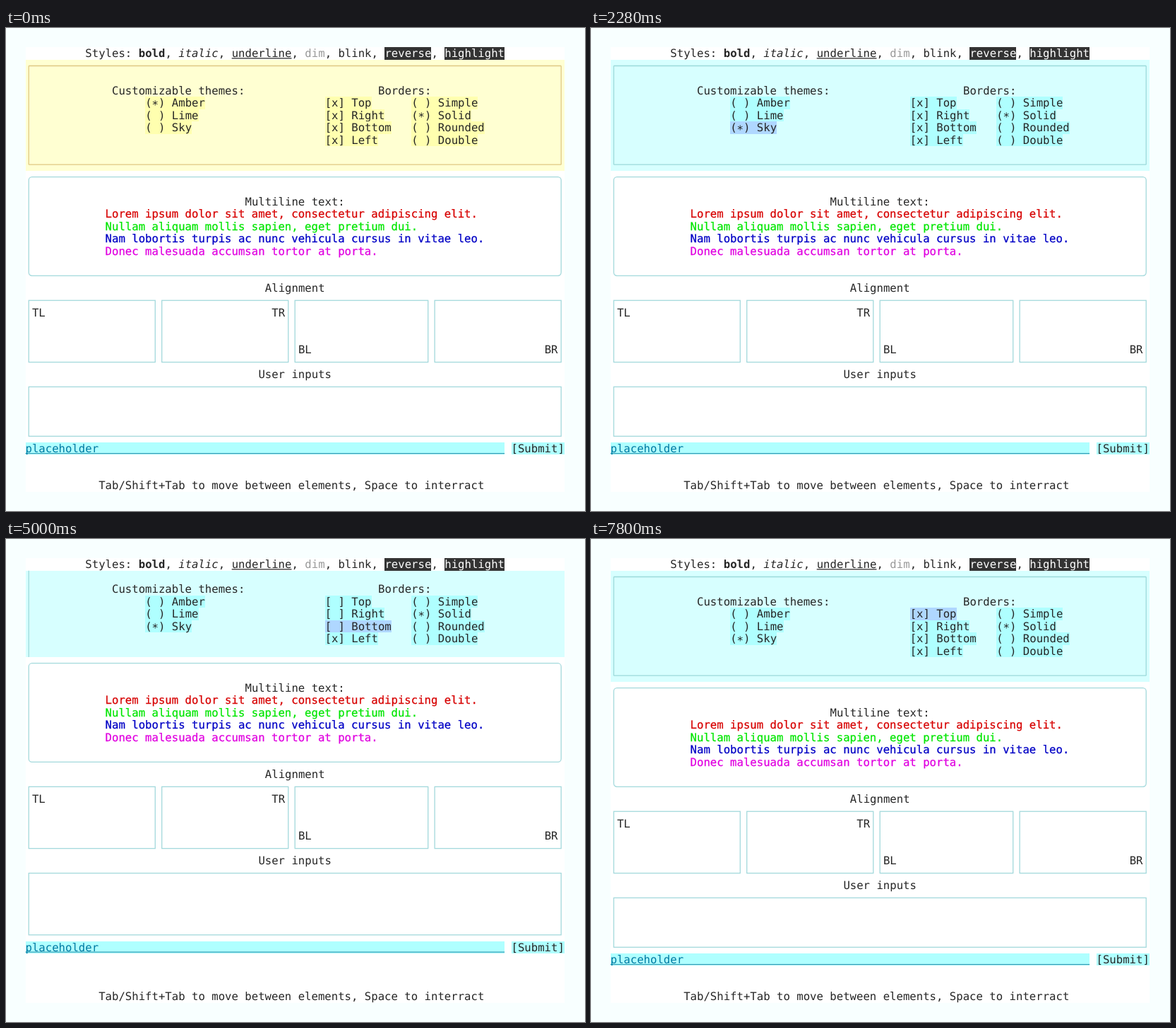
Write an HTML page that moves like this. It is 820 px wide and 683 px high and loops after 8000 ms.

```html
<!DOCTYPE html>
<html lang="en">
<head>
<meta charset="utf-8">
<title>Terminal form demo</title>
<style>
  html, body { margin: 0; width: 100%; height: 100%; overflow: hidden; background: #f8ffff; }
  svg { display: block; width: 820px; height: 683px; }
  text { font: 15.655px "DejaVu Sans Mono", monospace; white-space: pre; text-rendering: geometricPrecision; }
  rect { shape-rendering: crispEdges; }
  path { fill: none; stroke-width: 1.3; }
</style>
</head>
<body>
<svg id="screen" viewBox="0 0 820 683"></svg>
<script>
const LOOP = 8000, COLS = 81, ROWS = 36;
const CELL_W = 9.425, CELL_H = 17.46;
const INK = '#262626', LINE = '#a3d9dc';
const screen = document.getElementById('screen');

const themes = {
  Amber: { panel: '#ffffd2', item: '#ffffaf', focus: '#ffd7af', line: '#dfc883' },
  Lime: { panel: '#d7ffd7', item: '#d7ffaf', focus: '#d7d7af', line: '#aee0a0' },
  Sky: { panel: '#d7ffff', item: '#afffff', focus: '#afd7ff', line: '#9cd9da' },
};
const sides = ['Top', 'Right', 'Bottom', 'Left'];

// start time, selected theme, focused item, initials of the visible borders
const steps = [
  [0, 'Amber', '', 'TRBL'],
  [440, 'Amber', 'Amber', 'TRBL'],
  [920, 'Amber', 'Lime', 'TRBL'],
  [1360, 'Lime', 'Lime', 'TRBL'],
  [1800, 'Lime', 'Sky', 'TRBL'],
  [2280, 'Sky', 'Sky', 'TRBL'],
  [2680, 'Sky', 'Top', 'TRBL'],
  [3160, 'Sky', 'Top', 'RBL'],
  [3640, 'Sky', 'Right', 'RBL'],
  [4080, 'Sky', 'Right', 'BL'],
  [4560, 'Sky', 'Bottom', 'BL'],
  [5000, 'Sky', 'Bottom', 'L'],
  [5440, 'Sky', 'Left', 'L'],
  [5920, 'Sky', 'Left', ''],
  [6360, 'Sky', 'Left', 'L'],
  [6840, 'Sky', 'Bottom', 'BL'],
  [7320, 'Sky', 'Right', 'RBL'],
  [7800, 'Sky', 'Top', 'TRBL'],
];

const px = col => +(27.5 + col * CELL_W).toFixed(2);
const py = row => +(27.3 + row * CELL_H).toFixed(2);

const fill = (col, row, w, h, color) =>
  `<rect x="${px(col)}" y="${py(row)}" width="${w * CELL_W}" height="${h * CELL_H}" fill="${color}"/>`;

const text = (col, row, str, color = INK, attrs = '', dy = 0) =>
  `<text x="${px(col)}" y="${py(row) + 14 + dy}" fill="${color}" ${attrs}>${str}</text>`;

const stroke = (d, color) => `<path d="${d}" stroke="${color}"/>`;

const underline = (col, row, w, color) =>
  stroke(`M${px(col)} ${py(row) + 15.6}h${w * CELL_W}`, color);

// Boxes run through the centres of their outermost cells.
function box(c0, r0, c1, r1, radius = 0) {
  const x = px(c0 + .5), y = py(r0 + .5);
  return `<rect x="${x}" y="${y}" width="${px(c1 + .5) - x}" height="${py(r1 + .5) - y}" rx="${radius}"
    fill="none" stroke="${LINE}" stroke-width="1.3" style="shape-rendering:auto"/>`;
}

function header() {
  return text(9, 0, 'Styles:') +
    text(17, 0, 'bold', INK, 'font-weight="700" style="font-weight:700"') + text(21, 0, ',') +
    text(23, 0, 'italic', INK, 'style="font-style:italic"') + text(29, 0, ',') +
    text(31, 0, 'underline') + underline(31, 0, 9, INK) + text(40, 0, ',') +
    text(42, 0, 'dim', '#999') + text(45, 0, ', blink,') +
    fill(54, 0, 7, 1, '#333') + text(54, 0, 'reverse', '#fff') + text(61, 0, ',') +
    fill(63, 0, 9, 1, '#333') + text(63, 0, 'highlight', '#fff');
}

function panelBorder(has, last, color) {
  const l = px(has.Left ? .5 : 0), r = px(has.Right ? COLS - .5 : COLS);
  const t = py(has.Top ? 1.5 : 1), b = py(has.Bottom ? last + .5 : last + 1);
  let d = '';
  if (has.Top) d += `M${l} ${t}H${r}`;
  if (has.Right) d += `M${r} ${t}V${b}`;
  if (has.Bottom) d += `M${l} ${b}H${r}`;
  if (has.Left) d += `M${l} ${t}V${b}`;
  return stroke(d, color);
}

function draw([, theme, focus, borders]) {
  const colors = themes[theme];
  const has = Object.fromEntries(sides.map(s => [s, borders.includes(s[0])]));
  const top = has.Top ? 3 : 2;
  const last = top + 5 + has.Bottom;
  const left = has.Left ? 0 : -1;

  const item = (col, row, label, brackets, mark) =>
    fill(col, row, label.length + 4, 1, label === focus ? colors.focus : colors.item) +
    text(col, row, `${brackets[0]} ${brackets[1]} ${label}`) +
    text(col + 1, row, mark, INK, '', mark === '*' ? 2.7 : 0);
  const radio = (col, row, label, on) => item(col, row, label, '()', on ? '*' : '');
  const check = (col, row, label, on) => item(col, row, label, '[]', on ? 'x' : '');

  let out = fill(0, 0, COLS, ROWS, '#fff') + header();

  out += fill(0, 1, COLS, last, colors.panel) + panelBorder(has, last, colors.line);
  out += text(13 + left, top, 'Customizable themes:') + text(53, top, 'Borders:');
  Object.keys(themes).forEach((name, i) => out += radio(18 + left, top + 1 + i, name, name === theme));
  sides.forEach((name, i) => out += check(45, top + 1 + i, name, has[name]));
  ['Simple', 'Solid', 'Rounded', 'Double'].forEach((name, i) =>
    out += radio(58, top + 1 + i, name, name === 'Solid'));

  const r = last + 1;
  out += box(0, r, 80, r + 8, 4.7) + text(33, r + 2, 'Multiline text:');
  [
    ['Lorem ipsum dolor sit amet, consectetur adipiscing elit.', '#d70000'],
    ['Nullam aliquam mollis sapien, eget pretium dui.', '#00e600'],
    ['Nam lobortis turpis ac nunc vehicula cursus in vitae leo.', '#0000c5'],
    ['Donec malesuada accumsan tortor at porta.', '#e000e0'],
  ].forEach(([line, color], i) =>
    out += text(12, r + 3 + i, line, color, `stroke="${color}" stroke-width=".25"`));

  out += text(36, r + 9, 'Alignment');
  [[0, 19], [20, 39], [40, 60], [61, 80]].forEach(([a, b]) => out += box(a, r + 10, b, r + 15));
  out += text(1, r + 11, 'TL') + text(37, r + 11, 'TR') + text(41, r + 14, 'BL') + text(78, r + 14, 'BR');

  const input = has.Top ? 32 : 31;
  out += text(35, r + 16, 'User inputs') + box(0, r + 17, 80, input - 1);
  out += fill(0, input, 72, 1, '#afffff') + underline(0, input, 72, '#3a9fb8') +
    text(0, input, 'placeholder', '#0079a3');
  out += fill(73, input, 8, 1, '#afffff') + text(73, input, '[Submit]');
  out += text(11, 35, 'Tab/Shift+Tab to move between elements, Space to interract');
  screen.innerHTML = out;
}

let shown;
function tick() {
  const t = performance.now() % LOOP;
  const step = steps.findLast(s => s[0] <= t);
  if (step !== shown) draw(shown = step);
  requestAnimationFrame(tick);
}
tick();
</script>
</body>
</html>
```
